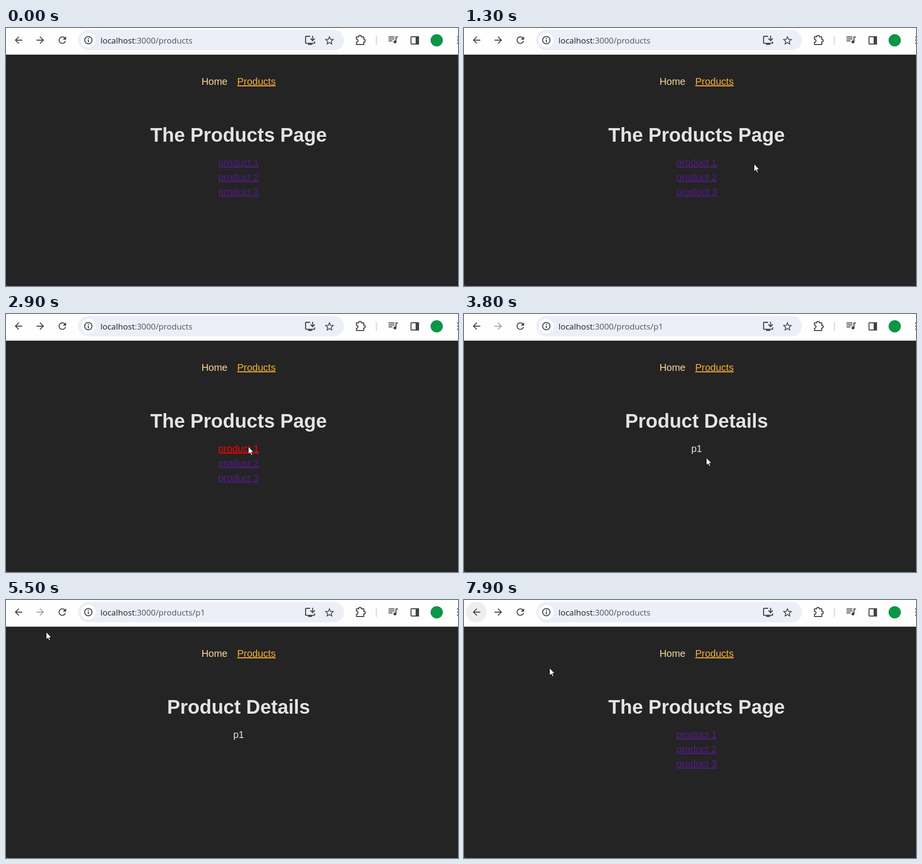
These frames come from a looping animation (928x531 px, 8 s). An HTML page:

```html
<!DOCTYPE html>
<html lang="en">
<head>
<meta charset="utf-8">
<title>Products</title>
<style>
  html, body { margin: 0; width: 100%; height: 100%; overflow: hidden; background: #242424; }
  .stage { position: relative; width: 928px; height: 531px; overflow: hidden; background: #242424;
    font: 20px/30px "Liberation Sans", Arial, sans-serif; color: #e3e3e3; }
  .stage > * { position: absolute; }
  svg { left: 0; top: 0; overflow: hidden; }
  .icon { fill: #414345; }
  .line { fill: none; stroke: #414345; stroke-width: 2; }

  .url { left: 194px; top: 14px; font: 16.8px/23px "Open Sans", "Noto Sans", sans-serif;
    color: #50535a; white-space: pre; }
  .url b { font-weight: 400; color: #1f2023; }

  nav { left: 401.4px; top: 95px; white-space: nowrap; color: #fbd998; }
  nav span + span { margin-left: 20px; color: #fdb131; text-decoration: underline; }

  .page { left: 0; top: 198px; width: 955px; text-align: center; }
  h1 { margin: 0 0 20px; font-size: 40px; line-height: 44px; }
  .page u { color: #551a8b; }
  .page div { height: 30px; }

  /* one loop is 8s; 1.25% is 100ms */
  .list, .detail, .press, .pulse, .cursor { animation: 8s step-end infinite; }
  .list { animation-name: list; }
  .detail { animation-name: detail; }
  .page .press { animation-name: press; }
  .pulse { animation-name: pulse; }
  .cursor { animation-name: move; }

  @keyframes list {
    0% { visibility: visible; }
    38.75% { visibility: hidden; }
    91.25%, 100% { visibility: visible; }
  }
  @keyframes detail {
    0% { visibility: hidden; }
    38.75% { visibility: visible; }
    91.25%, 100% { visibility: hidden; }
  }
  @keyframes press {
    0% { color: #551a8b; }
    35% { color: #f00; }
    38.75%, 100% { color: #551a8b; }
  }
  @keyframes pulse {
    0% { fill: transparent; }
    86.25% { fill: #e6e6e6; }
    87.5% { fill: #dfdfdf; }
    91.25%, 100% { fill: #eee; }
  }
  @keyframes move {
    0%     { transform: translate(960px, 44px); animation-timing-function: steps(1); }
    1.25%  { transform: translate(922px, 70px); animation-timing-function: steps(3); }
    5%     { transform: translate(740px, 200px); animation-timing-function: steps(2); }
    7.5%   { transform: translate(690px, 233px); animation-timing-function: steps(3); }
    11.25% { transform: translate(656px, 249px); animation-timing-function: steps(1); }
    12.5%  { transform: translate(632px, 266px); animation-timing-function: steps(3); }
    16.25% { transform: translate(595px, 279px); animation-timing-function: steps(5); }
    22.5%  { transform: translate(537px, 288px); animation-timing-function: steps(4); }
    27.5%  { transform: translate(508px, 283px); animation-timing-function: steps(5); }
    33.75% { transform: translate(497px, 272px); animation-timing-function: steps(1); }
    40%    { transform: translate(497px, 272px); animation-timing-function: steps(5); }
    46.25% { transform: translate(497px, 295px); animation-timing-function: steps(1); }
    47.5%  { transform: translate(497px, 295px); animation-timing-function: steps(4); }
    52.5%  { transform: translate(470px, 258px); animation-timing-function: steps(3); }
    56.25% { transform: translate(382px, 189px); animation-timing-function: steps(2); }
    58.75% { transform: translate(305px, 154px); animation-timing-function: steps(2); }
    61.25% { transform: translate(205px, 110px); animation-timing-function: steps(3); }
    65%    { transform: translate(112px, 82px); animation-timing-function: steps(2); }
    67.5%  { transform: translate(93px, 72px); animation-timing-function: steps(1); }
    68.75% { transform: translate(82px, 65px); animation-timing-function: steps(4); }
    73.75% { transform: translate(38px, 45px); animation-timing-function: steps(3); }
    77.5%  { transform: translate(27px, 39px); animation-timing-function: steps(1); }
    93.75% { transform: translate(27px, 39px); animation-timing-function: steps(1); }
    95%    { transform: translate(45px, 53px); animation-timing-function: steps(3); }
    98.75%, 100% { transform: translate(175px, 139px); animation-timing-function: steps(1); }
  }
</style>
</head>
<body>
<div class="stage">
  <svg width="928" height="531" viewBox="0 0 928 531">
    <defs>
      <path id="arrow" d="M20 11H7.83l5.59-5.59L12 4l-8 8 8 8 1.41-1.41L7.83 13H20v-2z"/>
    </defs>
    <path fill="#fefefe" d="M0 0h928v54H0z"/>
    <path fill="#dcdcdc" d="M0 54h928v1H0z"/>
    <path fill="#4a4a4a" d="M0 525q0 6 6 6H0z"/>
    <circle class="pulse" cx="25" cy="25" r="21"/>
    <rect x="148" y="4" width="546" height="42" rx="21" fill="#eceff8"/>
    <circle cx="169" cy="25" r="15" fill="#fff"/>

    <g class="icon">
      <use href="#arrow" transform="translate(14.2 13.4) scale(.96)"/>
      <g transform="translate(81.9 13.4) scale(-.96 .96)">
        <use class="list" href="#arrow"/>
        <use class="detail" href="#arrow" fill="#a3a4a5"/>
      </g>
      <path transform="translate(104.2 13.4) scale(.96)" d="M17.65 6.35C16.2 4.9 14.21 4 12 4c-4.42 0-7.99 3.58-7.99 8s3.57 8 7.99 8c3.73 0 6.84-2.55 7.73-6h-2.08c-.82 2.33-3.04 4-5.65 4-3.31 0-6-2.69-6-6s2.69-6 6-6c1.66 0 3.14.69 4.22 1.78L13 11h7V4l-2.35 2.35z"/>
      <path d="M168 24h2v5.5h-2zM168 20.5h2v2h-2z"/>
      <path transform="translate(612 13) scale(1.03)" d="M20 17H4V5h8V3H4c-1.11 0-2 .89-2 2v12c0 1.1.89 2 2 2h4v2h8v-2h4c1.1 0 2-.9 2-2v-3h-2zM17 14l5-5-1.41-1.41L18 10.17V3h-2v7.17l-2.59-2.58L12 9z"/>
      <path transform="translate(652.3 14) scale(.98)" d="M22 9.24l-7.19-.62L12 2 9.19 8.63 2 9.24l5.46 4.73L5.82 21 12 17.27 18.18 21l-1.63-7.03L22 9.24zM12 15.4l-3.76 2.27 1-4.28-3.32-2.88 4.38-.38L12 6.1l1.71 4.04 4.38.38-3.32 2.88 1 4.28L12 15.4z"/>
      <path transform="translate(782.3 11.3) scale(1.02)" d="M15 6H3v2h12V6zm0 4H3v2h12v-2zM3 16h8v-2H3v2zM17 6v8.18c-.31-.11-.65-.18-1-.18-1.66 0-3 1.34-3 3s1.34 3 3 3 3-1.34 3-3V8h3V6h-5z"/>
      <path d="M841 17h7v17h-7z"/>
      <circle cx="928.5" cy="18.5" r="2"/>
      <circle cx="928.5" cy="25" r="2"/>
      <circle cx="928.5" cy="31.5" r="2"/>
    </g>
    <g class="line">
      <circle cx="169" cy="25" r="7.6"/>
      <path d="M719.5 18.3h4.3a3 3 0 0 1 6 0h4.7v4.8a3 3 0 0 1 0 6v4.9h-15v-4.6a3.2 3.2 0 0 0 0-6.4z"/>
      <rect x="831.5" y="18" width="15.5" height="15" rx="1"/>
    </g>
    <rect x="759" y="16" width="3" height="19" rx="1" fill="#d5e4f5"/>
    <circle cx="884.3" cy="25.3" r="12.6" fill="#0b9647"/>
  </svg>

  <div class="url"><b>localhost</b>:3000/products<span class="detail">/p1</span></div>
  <nav><span>Home</span><span>Products</span></nav>

  <div class="page list">
    <h1>The Products Page</h1>
    <div><u class="press">product 1</u></div>
    <div><u>product 2</u></div>
    <div><u>product 3</u></div>
  </div>
  <div class="page detail">
    <h1>Product Details</h1>
    <div>p1</div>
  </div>

  <svg class="cursor" width="14" height="21" viewBox="0 0 14 21">
    <path d="M.5 .8V16.6L4.2 13.2 6.6 18.7 9 17.6 6.7 12.2H11.5Z" fill="#fff" stroke="#000"/>
  </svg>
</div>
</body>
</html>
```
